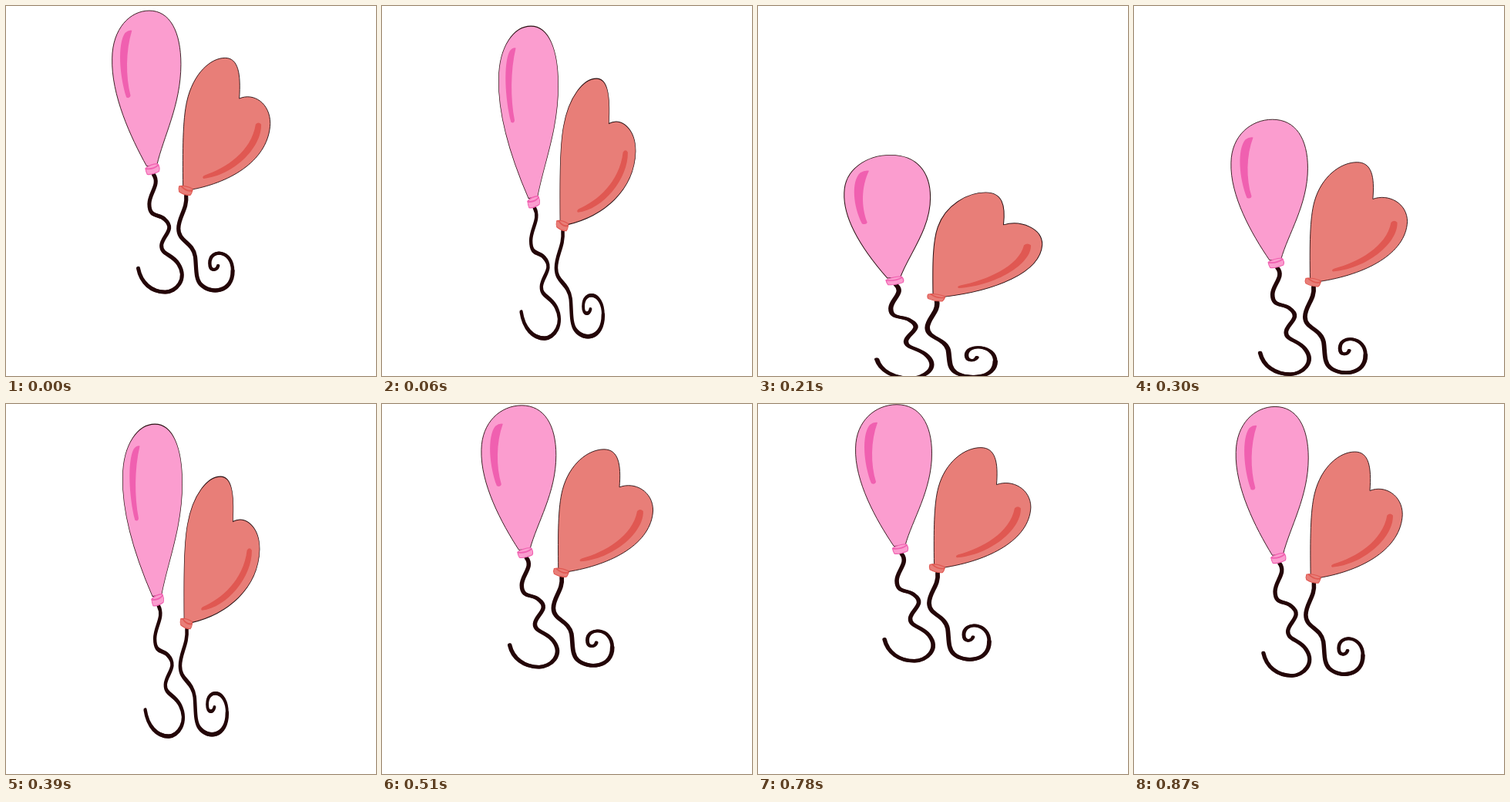
An HTML page with a canvas that plays this animation: 480 px wide and 480 px high, repeating every 900 ms.

```html
<!DOCTYPE html>
<html lang="en">
<head>
<meta charset="utf-8">
<title>Bouncing balloons</title>
<style>
  html, body { margin: 0; width: 100%; height: 100%; overflow: hidden; background: #fff; }
  canvas { display: block; width: 480px; height: 480px; }
</style>
</head>
<body>
<canvas id="stage" width="480" height="480"></canvas>
<script>
const ctx = document.getElementById('stage').getContext('2d');
const LOOP = 900, STEP = 30;
const BOUNCE = 750;                    // the rest of the loop is a pause at the top
const PIVOT_X = 240, PIVOT_Y = 335;    // bottom centre of the artwork
const DROP = 149.5, STRETCH = 0.385, SQUASH = 0.53;

const OUTLINE = '#2a1012', STRING = '#240608';

const balloons = [
  {
    fill: '#fb9dcf',
    accent: '#f060b0',
    body: new Path2D('M176 184 C153 150 125 100 126.5 57 C127 22 152 .7 180 .7 C210 .7 225.5 26 225.5 64 C225.5 112 200 150 191 183 Z'),
    shine: new Path2D('M155 24 C146 48 146 78 153 101 Q152 105 147 103 C137 78 134 40 145 27 Q150 23 155 24 Z'),
    knot: new Path2D('M174.5 187 Q181 182 192 181.5 Q196 186 194 190.5 Q184 195 177 194 Q175 191 174.5 187 Z'),
    fold: new Path2D('M175 187.5 Q186 188.5 193 183')
  },
  {
    fill: '#e87e78',
    accent: '#e05852',
    body: new Path2D('M228.5 208 C228 165 228 130 234 108 C243 75 268 56.5 289 56.5 C308 56.5 312 75 309.5 104.5 C330 97 354 110 354 134 C352 176 300 203 241 212 Z'),
    shine: new Path2D('M333 135 Q337 131 341 135 C342 163 300 196 258 199 Q255 197 260 195 C290 187 327 167 333 135 Z'),
    knot: new Path2D('M223 208 Q231 206.5 242 211 Q242 216 239 218.5 Q231 219 223 214.5 Q221.5 211 223 208 Z'),
    fold: new Path2D('M226 208 Q234 215 242 213')
  }
];

const strings = [
  { width: 4.4, path: new Path2D('M186 194 C196 206 180 216 180 229 C180 246 194 240 202 247 C219 259 198 267 197.5 278 C197 289 213 288 222 300 C236 318 218 333 203 333 C183 333 168 322 164 305') },
  { width: 4.6, path: new Path2D('M233 219 C235 235 222 244 222 258 C222 274 242 273 246 291 C248 304 246 317 254 324 C268 336 300 334 300 308') },
  { width: 3.7, path: new Path2D('M300 308 C300 283 267 281 267 299 C267 309 277 308 279 302') }
];

function easeInOut(x) {
  const t = Math.max(0, Math.min(1, x));
  return t < 0.5 ? 4 * t ** 3 : 1 - 4 * (1 - t) ** 3;
}

function stroke(path, color, width) {
  ctx.strokeStyle = color;
  ctx.lineWidth = width;
  ctx.stroke(path);
}

function fill(path, color) {
  ctx.fillStyle = color;
  ctx.fill(path);
}

// Two strokes side by side thicken the vertical runs, like a flat pen.
function drawString({ path, width }) {
  for (const shift of [-0.6, 0.6]) {
    ctx.save();
    ctx.translate(shift, 0);
    stroke(path, STRING, width);
    ctx.restore();
  }
}

function drawBalloon({ body, shine, knot, fold, fill: color, accent }) {
  fill(body, color);
  stroke(body, OUTLINE, 0.9);
  fill(shine, accent);
  fill(knot, color);
  stroke(knot, accent, 1.1);
  stroke(fold, accent, 1.7);
}

function draw(time) {
  const phase = (time + LOOP - BOUNCE) % LOOP;
  // 0 at the top, 1 at the lowest point; the rise mirrors the fall.
  const progress = Math.max(0, 1 - Math.abs(phase / BOUNCE * 2 - 1));
  const fall = easeInOut(progress);
  const landing = easeInOut((progress - 0.375) / 0.727);
  const widen = SQUASH * landing - STRETCH * fall;

  ctx.setTransform(1, 0, 0, 1, 0, 0);
  ctx.fillStyle = '#fff';
  ctx.fillRect(0, 0, 480, 480);
  ctx.translate(PIVOT_X, PIVOT_Y + DROP * fall);
  ctx.scale(1 + widen, 1 - widen);
  ctx.translate(-PIVOT_X, -PIVOT_Y);
  ctx.lineCap = ctx.lineJoin = 'round';

  strings.forEach(drawString);
  balloons.forEach(drawBalloon);
}

function tick() {
  draw(Math.floor(performance.now() % LOOP / STEP) * STEP);
  requestAnimationFrame(tick);
}
tick();
</script>
</body>
</html>
```
